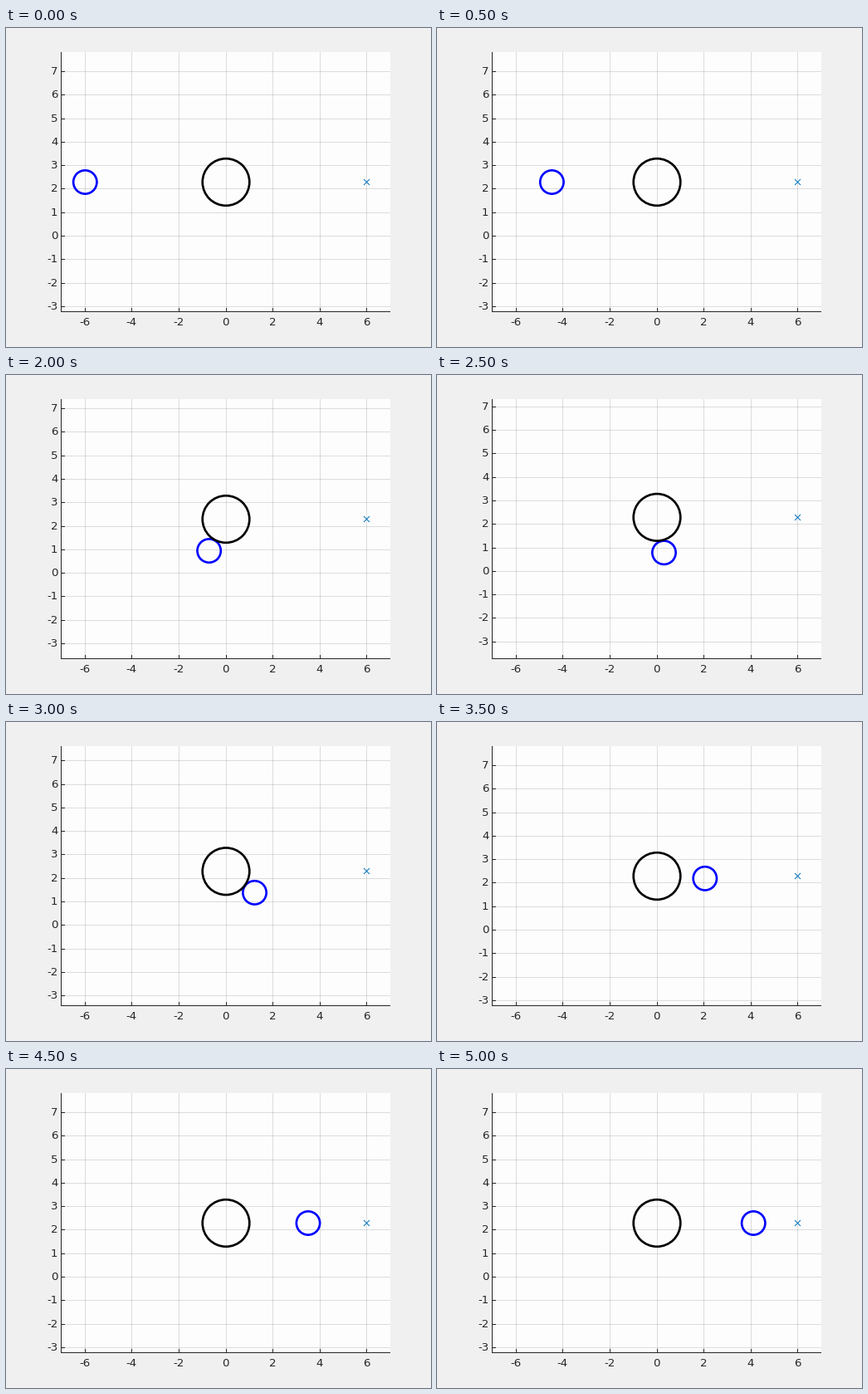
Recreate the animation shown at these times as a matplotlib script. Size 512 px wide and 384 px high, loop 5500 ms.

```python
import math

import matplotlib.pyplot as plt
from matplotlib.animation import FuncAnimation
from matplotlib.patches import Circle, Rectangle

W, H, DPI = 512, 384, 96
PX = 72 / DPI                                # points per pixel
LEFT, RIGHT, TOP, BOTTOM = 67, 463, 29, 342  # plot box
MID_X, MID_Y = (LEFT + RIGHT) / 2, (TOP + BOTTOM) / 2
UNIT = (RIGHT - LEFT) / 14                   # pixels per data unit
INK, BLUE = "#262626", "#0072bd"
GRID = (0.15, 0.15, 0.15, 0.15)

OBSTACLE, OBSTACLE_R = (0, 2.3), 1
GOAL = (6, 2.3)
BALL_R = 0.5
PATH = [(-6, 2.3), (-4.476, 2.3), (-3.1, 2.29), (-1.85, 2.12),
        (-0.72, 0.956), (0.3, 0.8), (1.22, 1.394), (2.044, 2.2),
        (2.81, 2.3), (3.5, 2.3), (4.11, 2.3)]

fig = plt.figure(figsize=(W / DPI, H / DPI), dpi=DPI, facecolor="#f0f0f0")
ax = fig.add_axes([0, 0, 1, 1])
ax.set_xlim(0, W)
ax.set_ylim(H, 0)
ax.axis("off")


def line(xs, ys, color, z):
    return ax.plot(xs, ys, color=color, lw=PX, zorder=z, snap=False,
                   solid_capstyle="butt")[0]


def label(x, y, value, align):
    return ax.text(x, y, f"{value}", family="DejaVu Sans", size=10,
                   color=INK, ha=align, va="baseline")


def ring(radius, color, z):
    return ax.add_patch(Circle((0, 0), radius * UNIT, fill=False, ec=color,
                               lw=2, zorder=z, snap=False))


def to_x(v):
    return MID_X + v * UNIT


def pixel(p):
    return math.floor(p) + 0.5


ax.add_patch(Rectangle((LEFT - 1, TOP), RIGHT - LEFT + 1, BOTTOM - TOP,
                       fc="#fdfdfd", ec="none", zorder=0, snap=False))
line([LEFT - 0.5] * 2, [TOP, BOTTOM], INK, 3)
line([LEFT - 1, RIGHT], [BOTTOM - 0.5] * 2, INK, 3)
for v in range(-6, 7, 2):
    x = pixel(to_x(v))
    line([x, x], [TOP, BOTTOM - 1], GRID, 1)
    line([x, x], [BOTTOM - 5, BOTTOM - 1], INK, 3)
    label(to_x(v) - 0.5, 358, v, "center")

rows = [(v, line([LEFT, RIGHT], [0, 0], GRID, 1),
         line([LEFT, LEFT + 4], [0, 0], INK, 3),
         label(62.5, 0, v, "right")) for v in range(-3, 8)]
ball = ring(BALL_R, "blue", 5)
obstacle = ring(OBSTACLE_R, "black", 6)
goal = [(slope, line([0, 0], [0, 0], BLUE, 4)) for slope in (-1, 1)]


def update(i):
    bx, by = PATH[i]
    # The view stays centred on the vertical extent of both circles.
    low = min(OBSTACLE[1] - OBSTACLE_R, by - BALL_R)
    centre = (low + OBSTACLE[1] + OBSTACLE_R) / 2

    def to_y(v):
        return MID_Y + (centre - v) * UNIT

    for v, grid, tick, text in rows:
        y = pixel(to_y(v))
        grid.set_ydata([y, y])
        tick.set_ydata([y, y])
        text.set_y(y + 3.5)
    ball.center = to_x(bx), to_y(by)
    obstacle.center = to_x(OBSTACLE[0]), to_y(OBSTACLE[1])
    gx, gy = pixel(to_x(GOAL[0])), pixel(to_y(GOAL[1]))
    for slope, stroke in goal:
        stroke.set_data([gx - 3.5, gx + 3.5],
                        [gy - 3.5 * slope, gy + 3.5 * slope])
    return []


anim = FuncAnimation(fig, update, frames=len(PATH), interval=500,
                     repeat=True, repeat_delay=0, blit=False)
plt.show()
```
